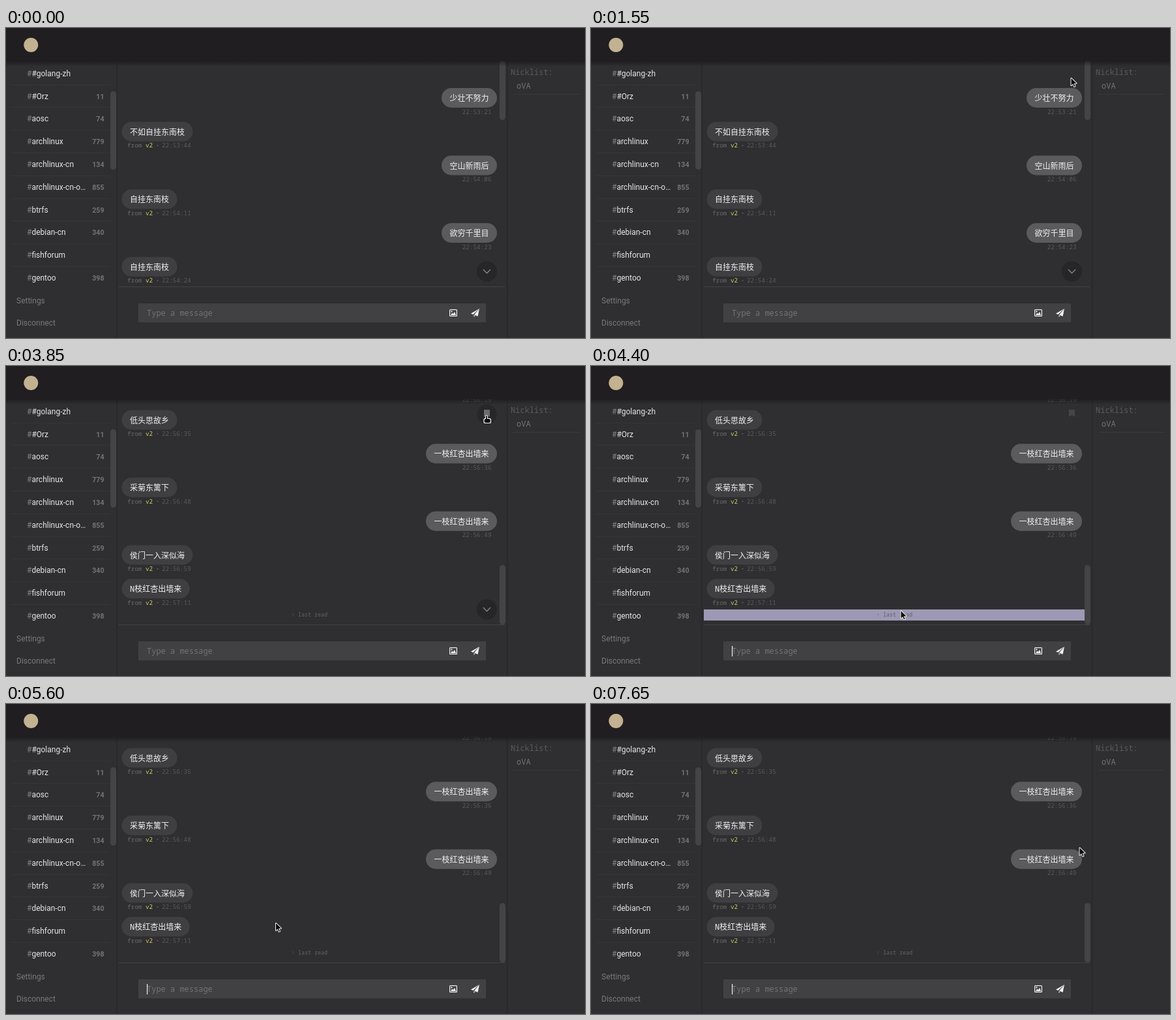
Animation of 888x475 px, one loop 8000 ms. Source, as an HTML page with a canvas:

```html
<!DOCTYPE html>
<html lang="zh-CN">
<head>
<meta charset="utf-8">
<title>Chat: jump to last read</title>
<style>
html, body { margin: 0; width: 100%; height: 100%; overflow: hidden; background: #2f2e30; }
canvas { display: block; }
</style>
</head>
<body>
<canvas id="stage" width="888" height="475"></canvas>
<script>
const ctx = document.getElementById('stage').getContext('2d');
const W = 888, H = 475, LOOP = 8000, STEP = 50;
const HOVER = 2750, JUMP = 3850, RELEASE = 3950, FOCUS = 4050;
const ROW = 34.8, GAP = 51.75;

const SANS = '12px Roboto, sans-serif';
const COUNT = 'bold 10.67px Roboto, sans-serif';
const MONO = '12px "Noto Sans Mono", monospace';
const SMALL = '9.33px "Noto Sans Mono", monospace';
const TINY = '8.4px "Noto Sans Mono", monospace';
const CHAT = '12px "Noto Sans Mono", "Noto Sans CJK SC", sans-serif';

const BACK = '#2f2e30', FIELD = '#414043', THUMB = '#444346', EDGE = '#282729';
const WHITE = '#f2f1f3', SOFT = '#737274', DIM = '#5b5a5c';

// Channel name and unread count
const channels = [
  '#golang-zh', '#Orz 11', 'aosc 74', 'archlinux 779', 'archlinux-cn 134',
  'archlinux-cn-o… 855', 'btrfs 259', 'debian-cn 340', 'fishforum', 'gentoo 398'
];

// Time and text; ">" marks the user's own messages
const history = [
  '>22:53:21 少壮不努力', '22:53:44 不如自挂东南枝', '>22:54:06 空山新雨后',
  '22:54:11 自挂东南枝', '>22:54:23 欲穷千里目', '22:54:24 自挂东南枝'
];
const latest = [
  '>22:56:19 低头思故乡', '22:56:35 低头思故乡', '>22:56:36 一枝红杏出墙来',
  '22:56:48 采菊东篱下', '>22:56:49 一枝红杏出墙来', '22:56:59 侯门一入深似海',
  '22:57:11 N枝红杏出墙来'
];

const pointerStart = { x: 880, y: 330 };
const pointerMoves = [
  { from: 50, to: 1550, x: 735.5, y: 75.5 },
  { from: RELEASE, to: 4400, x: 474.5, y: 374 },
  { from: 4400, to: 4950, x: 409.5, y: 336 },
  { from: 5000, to: 5500, x: 413, y: 334.5 },
  { from: 5600, to: 6400, x: 763, y: 206 },
  { from: 6400, to: 7050, x: 748.5, y: 219 }
];

const ramp = (t, a, b) => Math.max(0, Math.min(1, (t - a) / (b - a)));
const smooth = p => p * p * (3 - 2 * p);
const mix = (a, b, p) => a + (b - a) * p;

function text(str, x, y, color, font, align = 'left') {
  ctx.font = font;
  ctx.textAlign = align;
  ctx.fillStyle = color;
  ctx.fillText(str, x, y);
}

function rect(x, y, w, h, color) {
  ctx.fillStyle = color;
  ctx.fillRect(x, y, w, h);
}

function pill(x, y, w, h, color, r = Math.min(w, h) / 2) {
  ctx.fillStyle = color;
  ctx.beginPath();
  ctx.roundRect(x, y, w, h, r);
  ctx.fill();
}

function disc(x, y, r, color) {
  pill(x - r, y - r, r * 2, r * 2, color);
}

function polygon(color, ...points) {
  ctx.fillStyle = color;
  ctx.beginPath();
  points.forEach(([x, y]) => ctx.lineTo(x, y));
  ctx.closePath();
  ctx.fill();
}

function faded(alpha, paint) {
  ctx.save();
  ctx.globalAlpha = alpha;
  paint();
  ctx.restore();
}

function drawSidebar() {
  channels.forEach((entry, i) => {
    const [name, count = ''] = entry.split(' ');
    const y = 73.7 + i * ROW;
    text('#', 32, y, '#858486', SANS);
    text(name, 32 + ctx.measureText('#').width, y, '#e6e5e7', SANS);
    text(count, 150.5, y, SOFT, COUNT, 'right');
    if (i) rect(8, Math.round(y - 22), 152, 1, '#363537');
  });
  ['Settings', 'Disconnect'].forEach((label, i) => text(label, 16, 421.5 + i * 34, '#79787a', SANS));
  pill(160, 97, 9, 120, THUMB);
  rect(169.5, 50, 1.5, H - 50, EDGE);
}

function drawMessage(entry, y) {
  const own = entry[0] === '>';
  const [time, body] = entry.replace('>', '').split(' ');
  ctx.font = CHAT;
  const w = ctx.measureText(body).width + 25;
  const x = own ? 753 - w : 177.5;
  pill(x, y, w, 30, own ? '#5b5a5d' : '#3f3e41');
  text(body, x + 12.5, y + 20, WHITE, CHAT);

  const base = y + 39.5;
  if (own) return text(time, 744.5, base, DIM, SMALL, 'right');
  text('from', 186, base, '#6b6a6c', SMALL);
  text('v2', 214, base, '#cfd06a', SMALL);
  disc(232.5, base - 3.2, 1.1, DIM);
  text(time, 239, base, DIM, SMALL);
}

function drawBookmark(t) {
  if (t >= JUMP) faded(1 - ramp(t, RELEASE, 4300), () => disc(737.5, 74, 15, '#272628'));
  const alpha = ramp(t, 2900, 3450) * (1 - ramp(t, RELEASE, 4650));
  faded(alpha * 0.7, () => {
    polygon('#8a898b', [733, 67], [742, 67], [742, 78], [737.5, 75], [733, 78]);
  });
}

function drawDownButton(t) {
  faded(1 - ramp(t, RELEASE, 4300), () => {
    disc(737.5, 373, 15.5, '#262527');
    ctx.strokeStyle = '#858486';
    ctx.lineWidth = 1.4;
    ctx.beginPath();
    ctx.moveTo(732, 370);
    ctx.lineTo(737.5, 375.7);
    ctx.lineTo(743, 370);
    ctx.stroke();
  });
}

function drawChat(t) {
  const jumped = t >= JUMP;
  const firstY = jumped ? 67.5 - GAP : 92;
  ctx.save();
  ctx.beginPath();
  ctx.rect(171, 50, 597, 346);
  ctx.clip();
  (jumped ? latest : history).forEach((entry, i) => drawMessage(entry, firstY + i * GAP));
  if (jumped) {
    const glow = 1 - Math.abs(ramp(t, 3900, 5400) * 2 - 1);
    rect(173, 373, 584, 17, `rgba(212,206,246,${glow})`);
    text('↑ last read', 465.5, 384, '#636265', TINY, 'center');
  }
  pill(757, jumped ? 305 : 50, 9, 91, THUMB);
  ctx.restore();
  rect(173, 396, 592, 1, '#434244');
  rect(768, 50, 1.5, H - 50, EDGE);
  drawBookmark(t);
  drawDownButton(t);
}

function drawInput(t) {
  rect(203, 422, 533, 29, FIELD);
  text('Type a message', 216, 441, SOFT, MONO);

  // Picture icon
  pill(680, 431, 12, 11, WHITE, 1.5);
  rect(681.2, 432.2, 9.6, 8.6, FIELD);
  disc(683.4, 434.4, 1.1, WHITE);
  polygon(WHITE, [682, 440], [684, 436.5], [686, 438], [688, 434.7], [690, 440]);

  // Paper plane
  polygon(WHITE, [726, 430], [713, 437.4], [716.3, 439]);
  polygon(WHITE, [726, 430], [718, 439.6], [723.6, 441.8]);
  polygon(WHITE, [717.5, 440], [717.5, 443], [719.4, 441]);

  const caretOn = t >= FOCUS && Math.floor((t - FOCUS) / 600) % 2 === 0;
  if (caretOn) rect(216, 429, 1.2, 16, WHITE);
}

function drawNicklist() {
  text('Nicklist:', 774, 71.5, DIM, MONO);
  text('oVA', 783, 92.5, SOFT, MONO);
  rect(778, 101, 102, 1, '#3a393b');
}

function drawHeader() {
  const shade = ctx.createLinearGradient(0, 50, 0, 59);
  shade.addColorStop(0, 'rgba(20,18,20,.6)');
  shade.addColorStop(1, 'rgba(20,18,20,0)');
  rect(0, 50, W, 9, shade);
  rect(0, 0, W, 50.5, '#201e20');
  disc(38.3, 26, 11, '#c3b291');
}

function pointerAt(t) {
  return pointerMoves.reduce((at, move) => {
    const p = smooth(ramp(t, move.from, move.to));
    return { x: mix(at.x, move.x, p), y: mix(at.y, move.y, p) };
  }, pointerStart);
}

function drawHand() {
  const layers = [[0.6, WHITE], [-0.6, '#0c0b0c']];
  for (const [grow, color] of layers) {
    pill(-grow, -grow, 3 + grow * 2, 10 + grow * 2, color);
    pill(-2.5 - grow, 5 - grow, 10.5 + grow * 2, 7 + grow * 2, color, 2.5);
  }
}

function drawArrow() {
  ctx.strokeStyle = WHITE;
  ctx.lineWidth = 2;
  ctx.lineJoin = 'round';
  for (const paint of ['stroke', 'fill']) {
    ctx.fillStyle = '#0c0b0c';
    ctx.beginPath();
    [[1, 1.5], [1, 12.5], [3.6, 10], [5.6, 14.4], [7, 13.8], [5.1, 9.4], [9, 9.2]]
      .forEach(([x, y]) => ctx.lineTo(x, y));
    ctx.closePath();
    ctx[paint]();
  }
}

function drawPointer(t) {
  if (t < 50) return;
  const { x, y } = pointerAt(t);
  ctx.save();
  ctx.translate(x, y);
  if (t >= HOVER && t <= RELEASE) drawHand();
  else drawArrow();
  ctx.restore();
}

function draw(t) {
  rect(0, 0, W, H, BACK);
  drawSidebar();
  drawChat(t);
  drawInput(t);
  drawNicklist();
  drawHeader();
  drawPointer(t);
}

const start = performance.now();
function tick() {
  const t = (performance.now() - start) % LOOP;
  draw(Math.floor(t / STEP) * STEP);
  requestAnimationFrame(tick);
}
tick();
</script>
</body>
</html>
```
